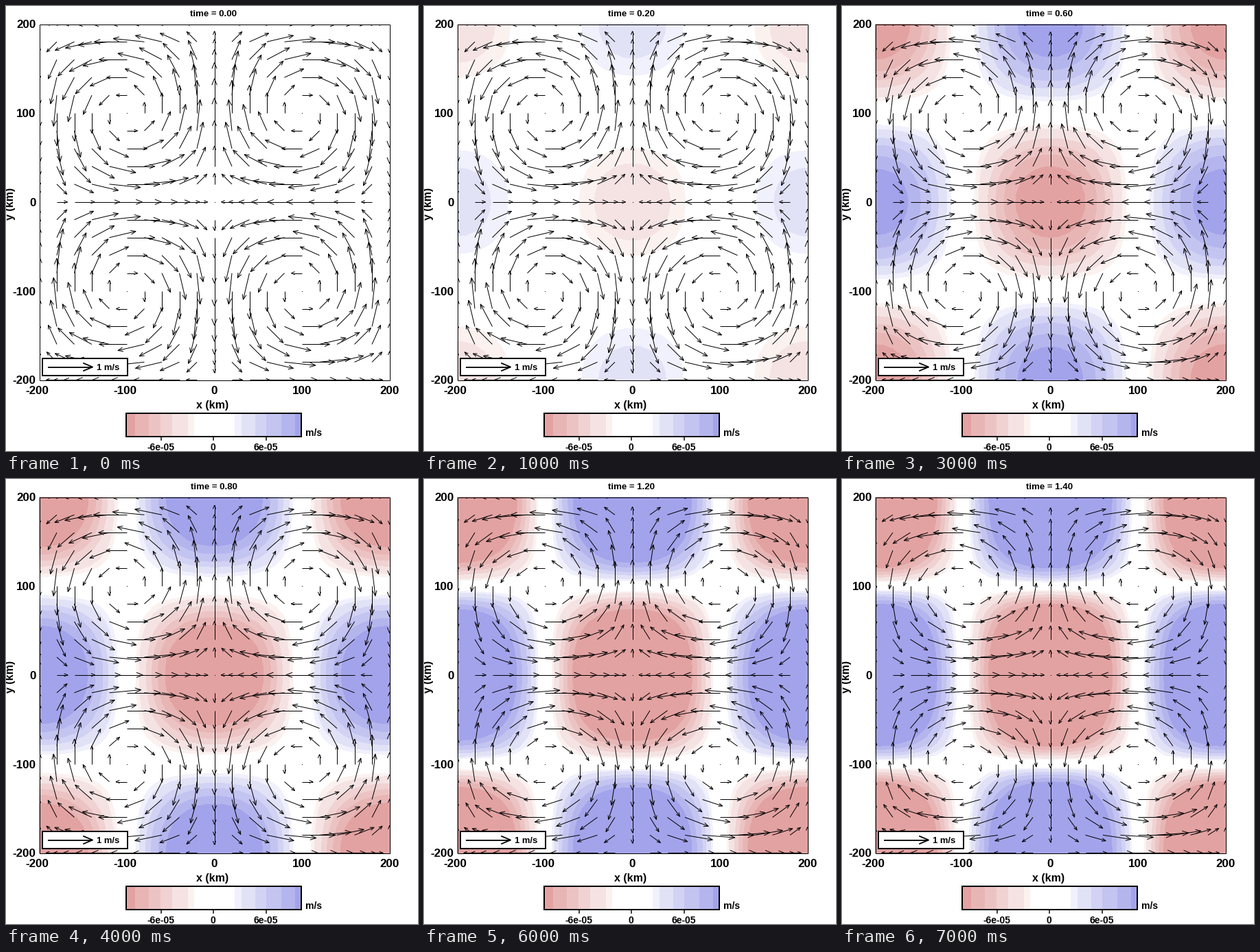
Write a matplotlib script that moves like this. It is 600 px wide and 649 px high and loops after 8 s.

```python
import numpy as np
import matplotlib.pyplot as plt
from matplotlib.animation import FuncAnimation
from matplotlib.collections import LineCollection
from matplotlib.patches import Rectangle

W, H = 600, 649
FRAMES, INTERVAL, DT = 8, 1000, 0.2
REF = 65            # pixels per 1 m/s
SPEED = 0.77        # peak speed of the vortices, m/s

# Vertical velocity levels in 1e-4 m/s, and the bands between them
LEVELS = [-0.898, -0.741, -0.608, -0.474, -0.298, -0.222,
          0.238, 0.319, 0.475, 0.60, 0.77, 0.93]
COLORS = ["#e3a2a2", "#e8b5b5", "#ecc3c3", "#f0d2d2", "#f5e3e3", "#fbf2f0",
          "#ffffff",
          "#f1f1fd", "#e2e2f7", "#d2d2f4", "#c4c4f1", "#b5b5ee", "#a3a3eb"]

plt.rcParams["font.family"] = "Liberation Sans"
plt.rcParams["font.weight"] = "bold"

fig = plt.figure(figsize=(W / 72, H / 72), dpi=72, facecolor="white")
ax = fig.add_axes([0, 0, 1, 1])
ax.set_xlim(0, W)
ax.set_ylim(H, 0)
ax.axis("off")


def px(x):
    return 303.5 + 1.275 * x


def py(y):
    return 285.8 - 1.2975 * y


def label(x, y, text, size, ha="center", **kw):
    style = dict(va="baseline") | kw
    return ax.text(x, y, text, fontsize=size, ha=ha, **style)


def box(x0, y0, x1, y1, lw, fill="none", z=4):
    patch = Rectangle((x0, y0), x1 - x0, y1 - y0, fc=fill, ec="black",
                      lw=lw, zorder=z)
    return ax.add_patch(patch)


def arrows(start, step, head=0.2, least=5.5, angle=22):
    """Shafts and open heads for (n, 2) arrays of tails and vectors in pixels."""
    size = np.hypot(*step.T)
    keep = size > 1
    start, step, size = start[keep], step[keep], size[keep, None]
    tip = start + step
    along = step / size
    across = along[:, ::-1] * [-1, 1]
    barb = np.maximum(head * size, least)
    a = np.radians(angle)
    back, side = barb * np.cos(a) * along, barb * np.sin(a) * across
    shafts = np.stack([start, tip], axis=1)
    heads = np.stack([tip - back + side, tip, tip - back - side], axis=1)
    return list(shafts) + list(heads)


def modes(step):
    """Grid over the domain with its cosine and sine modes."""
    km = np.arange(-200, 201, step)
    gx, gy = np.meshgrid(km, km)
    ax_, ay_ = np.pi * gx / 200, np.pi * gy / 200
    return px(gx), py(gy), np.cos(ax_), np.sin(ax_), np.cos(ay_), np.sin(ay_)


# Map frame and axis labels
frame = box(48.5, 26.5, 558.5, 545.5, 1)
for v in (-200, -100, 0, 100, 200):
    label(px(v) - (3 if v < 0 else 0), 566, str(v), 17)
    label(43.5, py(v) + 6, str(v), 17, "right")
label(301, 587.5, "x (km)", 16)
label(14, 288, "y (km)", 16, "right", va="center", rotation=90)
title = label(302.5, 15, "", 13.3)

# Reference arrow
box(53, 514, 177, 539, 2, "white", 6)
ref = arrows(np.array([[61, 526.5]]), np.array([[65.0, 0.0]]), head=0.23, angle=23)
ax.add_collection(LineCollection(ref, colors="black", linewidths=1.8, zorder=7))
label(132.5, 531, "1 m/s", 13, "left", zorder=7)

# Colour bar
edges = [-1] + LEVELS + [1]
for lo, hi, color in zip(edges, edges[1:], COLORS):
    ax.add_patch(Rectangle((302.5 + 127.5 * lo, 594), 127.5 * (hi - lo), 34,
                           fc=color, ec="none", antialiased=False))
box(175, 594, 430, 628, 2)
for x, text in ((226, "-6e-05"), (302, "0"), (378.5, "6e-05")):
    ax.plot([x, x], [628, 633], color="black", lw=1.5)
    label(x - 0.7, 647.5, text, 14)
label(436, 627, "m/s", 14, "left")

# Stagnation points
ax.scatter([px(v) for v in (-100, 100, -100, 100, 0)],
           [py(v) for v in (100, 100, -100, -100, 0)],
           s=1, c="black", marker="s", linewidths=0, zorder=3)

wind = LineCollection([], colors="black", linewidths=1, zorder=3)
ax.add_collection(wind)
wind.set_clip_path(frame)
shading = []


def draw(i):
    t = i * DT
    while shading:
        shading.pop().remove()
    # Amplitude grows with time; late on the cells flatten along y
    x, y, cx, sx, cy, sy = modes(10)
    k = 2 * max(0, t - 1)
    w = -(1.95 * t - 0.24 * t ** 3) * cx * cy * (1 + k) / (1 + k * np.abs(cy))
    shading.append(ax.contourf(x, y, w, levels=LEVELS, colors=COLORS,
                               extend="both", antialiased=False, zorder=1))

    x, y, cx, sx, cy, sy = modes(20)
    u = -SPEED * (1 + 0.03 * t * t) * sx * cy
    v = SPEED * (1 - 0.17 * t * t) * cx * sy
    start = np.stack([x.ravel(), y.ravel()], axis=1)
    step = REF * np.stack([u.ravel(), -v.ravel()], axis=1)
    wind.set_segments(arrows(start, step))
    title.set_text(f"time = {t:.2f}")
    return wind, title


anim = FuncAnimation(fig, draw, frames=FRAMES, interval=INTERVAL,
                     repeat=True, repeat_delay=0, blit=False)
plt.show()
```
